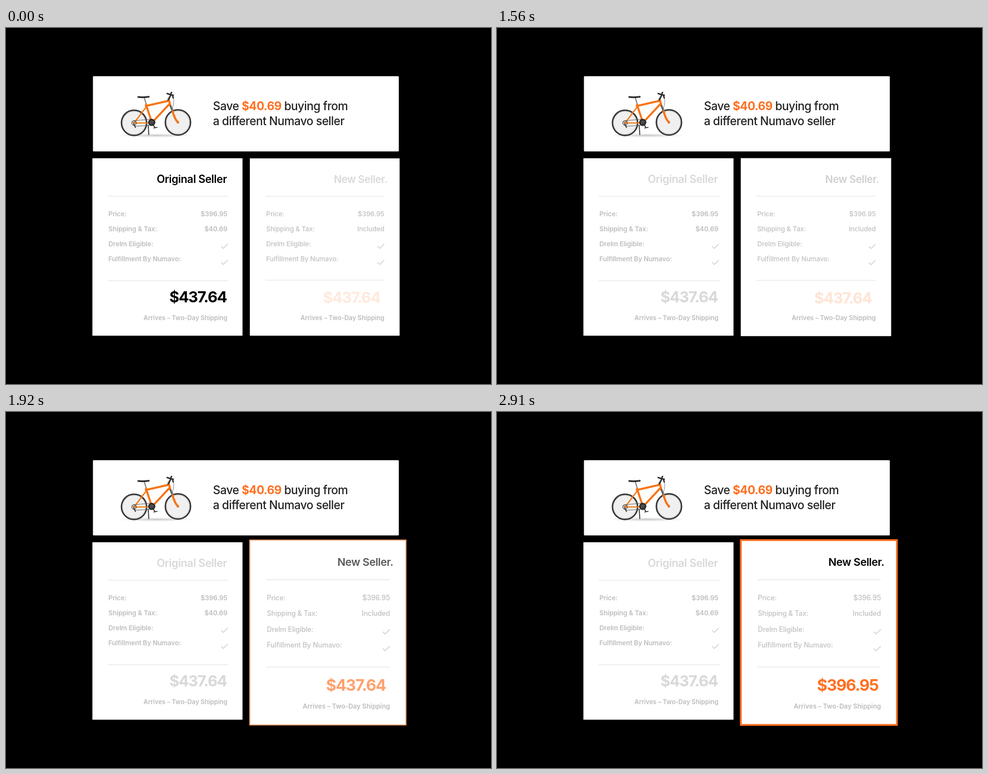
Write an HTML page that moves like this. It is 873 px wide and 641 px high and loops after 3900 ms.

```html
<!DOCTYPE html>
<html lang="en">
<head>
<meta charset="utf-8">
<title>Seller comparison</title>
<style>
  html, body { margin: 0; width: 100%; height: 100%; overflow: hidden; background: #000; }
  svg { display: block; width: 873px; height: 641px; }
  text { font-family: Inter, "Liberation Sans", sans-serif; font-optical-sizing: none; }
  .end { text-anchor: end; }

  .headline { font-size: 20.8px; font-weight: 500; letter-spacing: -.024em; fill: #222; }
  .headline tspan { font-weight: 700; fill: #ff6f20; }

  .title { font-size: 19.5px; font-weight: 600; letter-spacing: -.02em; }
  .new .title { font-size: 18.5px; }
  .rows { font-size: 12px; font-weight: 600; letter-spacing: -.012em; fill: #bebebe; }
  .new .rows { font-weight: 500; letter-spacing: -.008em; fill: #c0c0c0; }
  .total { font-size: 27.5px; font-weight: 700; letter-spacing: -.045em; }
  .new .total { fill: #ff6f20; }
  .ship { font-size: 11.27px; font-weight: 600; fill: #bcbcbc; }
  .rule { stroke: #ebebeb; stroke-width: 1.5; }
  .check { fill: none; stroke: #d6d6d6; stroke-width: 1.7; }

  .fade-out { animation: fade-out 3900ms linear infinite; }
  .fade-in { animation: fade-in 3900ms linear infinite; }
  .new { transform-origin: 439px 330px; animation: grow 3900ms linear infinite; }
  .edge { animation: edge 3900ms linear infinite; }

  @keyframes fade-out {
    0%, 23.077% { opacity: 1; }
    39.231%, 100% { opacity: .15; }
  }
  @keyframes fade-in {
    0%, 39.231% { opacity: .15; }
    56.154%, 100% { opacity: 1; }
  }
  @keyframes grow {
    0%, 39.231% { transform: scale(1); }
    49.231%, 100% { transform: scale(1.042); }
  }
  @keyframes edge {
    0%, 39.231% { stroke: #fff; stroke-width: 0; }
    56.154%, 100% { stroke: #ff6f20; stroke-width: 3.1; }
  }
</style>
</head>
<body>
<svg viewBox="0 0 873 641">
  <defs>
    <path id="check" class="check" d="M0 4.5l3.8 3.8L12 .4"/>
    <radialGradient id="shade">
      <stop offset="0" stop-color="#999" stop-opacity=".55"/>
      <stop offset="1" stop-color="#999" stop-opacity="0"/>
    </radialGradient>
    <g id="wheel" fill="none">
      <circle r="10.5" stroke="#f0f0f0" stroke-width="20" stroke-dasharray=".2 3.1"/>
      <circle r="20.8" stroke="#b0b0b0" stroke-width=".9"/>
      <circle r="22.7" stroke="#303030" stroke-width="2.5"/>
      <circle r="2" fill="#444"/>
    </g>
  </defs>

  <rect x="156.5" y="86.8" width="550.5" height="135.4" rx="1.5" fill="#fff"/>

  <g fill="none" stroke-linecap="round" stroke-linejoin="round">
    <ellipse cx="270" cy="193.5" rx="70" ry="3.5" fill="url(#shade)"/>
    <use href="#wheel" x="230.5" y="170.8"/>
    <use href="#wheel" x="309.5" y="170"/>
    <path d="M249 126l4 13" stroke="#777" stroke-width="1.8"/>
    <path d="M238 124.3q9 1 19-.5" stroke="#2b2b2b" stroke-width="3"/>
    <path d="M230.5 171l22-29M230.5 171h31" stroke="#f47b14" stroke-width="2.2"/>
    <path d="M252 138l10.5 32M251.5 140.5L293 131M295 136l-31 33M293 129l3 11" stroke="#f97316" stroke-width="3.6"/>
    <path d="M296 140l4.5 11" stroke="#666" stroke-width="3.4"/>
    <path d="M300 150q3 13 9.5 20" stroke="#f97316" stroke-width="3.8"/>
    <path d="M292.5 129l4-8M290 118l6 2 5 1M296 120l2-4M300 122l1 4" stroke="#2b2b2b" stroke-width="2.6"/>
    <path d="M301 125q3 10-2 20M294 123q-5 6-3 9" stroke="#555" stroke-width=".7"/>
    <path d="M231 167l31-3M232 177l29-2" stroke="#555" stroke-width=".8"/>
    <circle cx="262.3" cy="170" r="5" fill="#555" stroke="#2b2b2b" stroke-width="3"/>
    <circle cx="230.5" cy="171" r="4" stroke="#555" stroke-width="1.5" stroke-dasharray="2 1.5"/>
    <path d="M262 170l6 9M266 180l6-1M256 175l1 17M230 173l3 6" stroke="#333" stroke-width="1.7"/>
  </g>

  <g class="headline">
    <text x="372.5" y="148.4">Save <tspan>$40.69</tspan> buying from</text>
    <text x="372.5" y="175.4">a different Numavo seller</text>
  </g>

  <g>
    <rect x="155.5" y="234.5" width="270.2" height="319.5" fill="#fff"/>
    <path class="rule" d="M183 303h217.5M183 455h217.5"/>
    <text class="title end fade-out" x="397.5" y="279">Original Seller</text>
    <g class="rows">
      <text x="184.3" y="338.9">Price:</text>
      <text x="184.3" y="365.7">Shipping &amp; Tax:</text>
      <text x="184.3" y="393.2">Drelm Eligible:</text>
      <text x="184.3" y="420">Fulfillment By Numavo:</text>
      <text class="end" x="398.5" y="338.9">$396.95</text>
      <text class="end" x="398.5" y="365.7">$40.69</text>
    </g>
    <use href="#check" x="387.2" y="388.5"/>
    <use href="#check" x="387.2" y="417.5"/>
    <text class="total end fade-out" x="397" y="494.3">$437.64</text>
    <text class="ship end" x="398.5" y="525.8">Arrives – Two-Day Shipping</text>
  </g>

  <g class="new">
    <rect class="edge" x="438.9" y="234.7" width="269.6" height="319.3" fill="#fff"/>
    <path class="rule" d="M467 303h213.5M467 454h213.5"/>
    <text class="title end fade-in" x="686.7" y="279">New Seller.</text>
    <g class="rows">
      <text x="468.3" y="338.9">Price:</text>
      <text x="468.3" y="365.7">Shipping &amp; Tax:</text>
      <text x="468.3" y="393.2">Drelm Eligible:</text>
      <text x="468.3" y="420">Fulfillment By Numavo:</text>
      <text class="end" x="681" y="338.9">$396.95</text>
      <text class="end" x="681" y="365.7">Included</text>
    </g>
    <use href="#check" x="668.7" y="388.5"/>
    <use href="#check" x="668.7" y="417.5"/>
    <text id="total" class="total fade-in" x="570.5" y="495.3">$437.64</text>
    <text class="ship end" x="681" y="525.8">Arrives – Two-Day Shipping</text>
  </g>
</svg>
<script>
  const total = document.getElementById('total');
  const clock = total.getAnimations()[0];
  const LOOP = 3900, START = 2310, TICK = 30, TICKS = 20;
  const FROM = 437.64, TO = 396.95;

  // The price counts down in equal ticks, in time with the CSS loop.
  function draw() {
    const now = clock ? clock.currentTime : performance.now();
    const tick = Math.round(((now || 0) % LOOP - START) / TICK);
    const part = Math.min(Math.max(tick, 0), TICKS) / TICKS;
    const label = '$' + (FROM + (TO - FROM) * part).toFixed(2);
    if (total.textContent !== label) total.textContent = label;
    requestAnimationFrame(draw);
  }
  draw();
</script>
</body>
</html>
```
